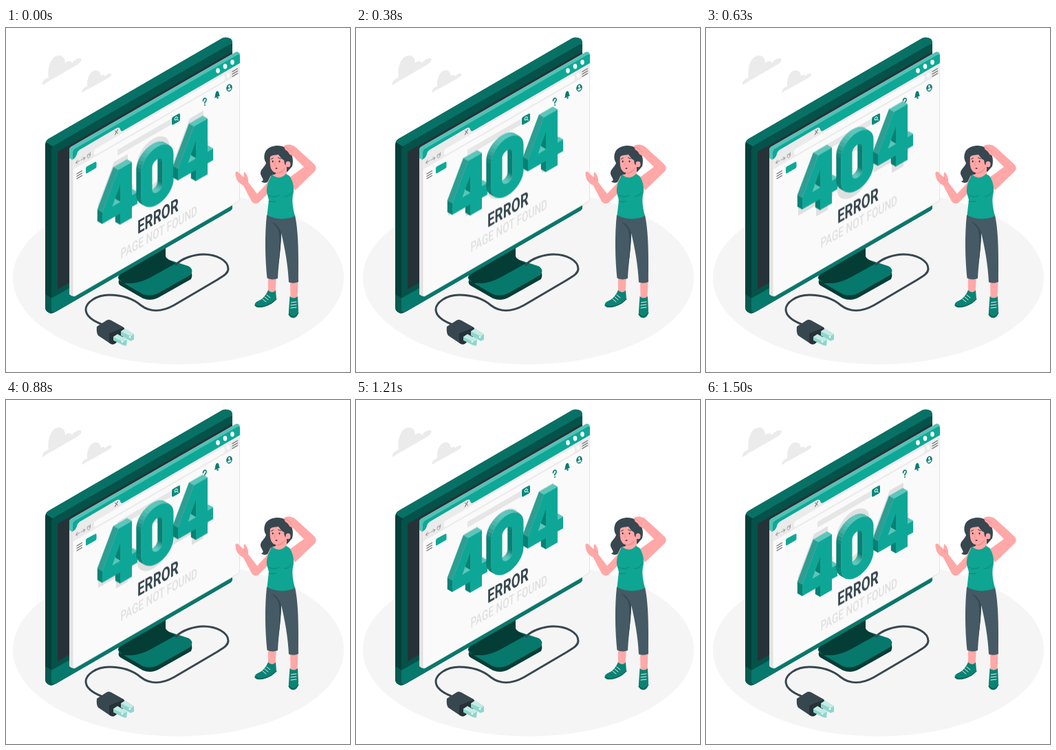
These frames come from a looping animation (500x500 px, 1.54 s). An HTML page:

```html
<!DOCTYPE html>
<html lang="en">
<head>
<meta charset="utf-8">
<title>404</title>
<style>
  html, body { margin: 0; width: 100%; height: 100%; overflow: hidden; background: #fff; }
  svg { display: block; width: 100vw; height: 100vh; }
  text { font-family: Roboto, Arial, sans-serif; }
  .float { animation: rise 770ms cubic-bezier(.37, 0, .63, 1) -60ms infinite alternate; }
  #digits { --lift: -22px; }
  #label { --lift: -16px; }
  @keyframes rise {
    from { transform: translateY(0); }
    to { transform: translateY(var(--lift)); }
  }
  .line { fill: none; stroke-linecap: round; stroke-linejoin: round; }
</style>
</head>
<body>
<svg viewBox="0 0 500 500">
  <ellipse cx="250.5" cy="363" rx="240.5" ry="126" fill="#f5f5f5"/>

  <g id="clouds" fill="#ebebeb">
    <path d="M53 83C52 78 56 74 62 72C60 60 64 43 74 40.500C82 38 86 44 86 51C90 47 95 48 96 51C99 46 106 43 109 44.500C111 47 108 50 104 53L68 74C62 76 58 81 53 83Z"/>
    <path d="M110 94C111 88 114 86 118 85C117 74 122 63 128 62C134 60 138 65 138 70C141 67 143 68 144 70C148 66 152 65 153 67C154 69 151 71 148 73L121 88C117 89 114 93 110 94Z"/>
  </g>

  <g id="stand">
    <path d="M166 363L222 332L266 352Q273 356 269 365L223 391Q211 398 199 393L166 374Q161 370 166 363Z" fill="#043d36"/>
    <path d="M166 358L222 327L234 336L265 346Q274 351 268 359L222 385Q211 391 199 387L166 368Q160 363 166 358Z" fill="#07786c"/>
    <path d="M163 363Q163 360 166 358L232 317V332Q233 336 247 342L211 362Q196 370 184 371L170 371Z" fill="#043d36"/>
  </g>

  <path class="line" stroke="#37474f" stroke-width="3" d="M247 344C256 334 275 329 287 329C306 329 323 338 323 350C323 357 315 361 307 366L244 403C226 413 209 413 196 403C182 391 164 388 150 388C130 388 116 400 116 409C116 419 127 426 140 431"/>

  <g id="plug">
    <path d="M132 434L146 425Q149 423 153 425L171 435Q173 437 172 447L158 459Q153 461 149 457L134 447Q131 443 132 434Z" fill="#37474f"/>
    <path d="M150 444L171 435.500Q173 438 172 447L158 459Q153 461 150 457Z" fill="#263238"/>
    <path d="M156 449L162 445L176 453L175 462L170 461L156 454Z" fill="#8fd6cd"/>
    <path d="M156 449L162 445L176 453L170 456Z" fill="#c4ebe5"/>
    <path d="M167 441L173 437L186 445V453L181 455L167 447Z" fill="#8fd6cd"/>
    <path d="M167 441L173 437L186 445L181 448Z" fill="#c4ebe5"/>
    <g fill="#fff"><circle cx="169" cy="456" r="1.300"/><circle cx="180" cy="449" r="1.300"/></g>
  </g>

  <g id="monitor">
    <path d="M57 170Q57 164 62 161L314 15Q320 12 327 16Q329 18 329 23V260Q329 264 325 266L71 413Q66 416 61 413Q57 411 57 405Z" fill="#04403a"/>
    <path d="M57 387L67 393V415Q63 415 61 413Q57 411 57 405Z" fill="#065a50"/>
    <path d="M58 166Q59 163 62 161L314 15Q320 12 327 16Q329 18 329 23L72 171Q68 173 66 171Z" fill="#087165"/>
    <path d="M66 178Q66 173 71 170L323 25Q329 22 329 28V260H66Z" fill="#05524a"/>
    <path d="M66 250H329V260Q329 264 325 266L73 412Q66 416 66 408Z" fill="#05524a"/>
    <path d="M66 393L329 242V260Q329 264 325 266L73 412Q66 416 66 408Z" fill="#07786c"/>
    <path d="M75 180L329 34V233L75 380Z" fill="#263238"/>
  </g>

  <g id="window">
    <path d="M92 177Q92 175 94 173L333 35.500Q336 33 340 37V248Q340 251 337 253L100 390Q96 391 92 387Z" fill="#e3e3e3"/>
    <path d="M97 180L339.500 41V248Q339.500 251 337 252.500L101 389Q97 391 97 386Z" fill="#fafafa" stroke="#e0e0e0" stroke-width=".8"/>
    <path d="M92 177Q92 175 94 173L333 35.500Q336 33 340 37L97 182V192L92 189Z" fill="#53c1b4"/>
    <path d="M97 181Q97 178 99.500 176L337 38.500Q340 37 340 40V52L97 192Z" fill="#0ea897"/>
    <path d="M97 191Q102 188 103 183Q104 179 107 177L160 146Q165 143 166 147Q166.500 151 170 149.500L340 51V66L97 206Z" fill="#ebebeb"/>
    <path d="M128 179.500Q128 177 131 175L315 69Q318 68 318 71V74Q318 76 315 78L131 184Q128 185 128 183Z" fill="#fafafa"/>
    <g fill="#fff">
      <ellipse cx="308" cy="62" rx="2.800" ry="3.700"/>
      <ellipse cx="318.500" cy="55.800" rx="2.800" ry="3.700"/>
      <ellipse cx="329" cy="49.800" rx="2.800" ry="3.700"/>
    </g>
    <g class="line" stroke="#9e9e9e">
      <path d="M107 193L101.500 196M104 192L101.500 196L104 197M109 192L115 188.500M112 188L115 188.500L113 192M122 184Q121 181 118.500 184Q117 188 119.500 189Q122 188 122.500 185M122.500 181V184.500H120"/>
    </g>
    <path class="line" stroke="#616161" d="M158.500 149.500L162.500 153M162.500 147.500L158.500 155"/>
    <path class="line" stroke="#757575" stroke-width="1.300" d="M329 63.500L336.500 59M329 67L336.500 62.500M329 70.500L336.500 66"/>
    <ellipse cx="323" cy="69" rx="2.500" ry="3.500" fill="#fafafa"/>
    <path class="line" stroke="#757575" stroke-width="1.400" d="M103 212L110.500 207.500M103 215.500L110.500 211M103 219L110.500 214.500"/>
    <path d="M116 204Q116 202 118 201L130 194.500Q131.500 194 131.500 196V201.500Q131.500 203 130 204L118 211Q116 212 116 210Z" fill="#0ea897"/>
    <path d="M162 177L240 132V140.500L162 185.500Z" fill="#e6e6e6"/>
    <path d="M241 132Q241 130 243 129L251 124.500Q253 123.500 253 125.500V133Q253 135 251 136L243 140.500Q241 141 241 139.500Z" fill="#0a8a7d"/>
    <path class="line" stroke="#fff" d="M249.500 130.500Q249 128 246.500 129.500Q244.500 132 245.500 134Q247.500 135 249.500 130.500M248.500 133L250.500 134"/>
    <g id="icons" fill="#0a7c70">
      <path class="line" stroke="#0a7c70" stroke-width="1.600" d="M286.500 106Q286.500 103 289 102Q291.500 102 291 105Q290.500 107 289 108V109.500"/>
      <circle cx="289" cy="112" r="1"/>
      <path d="M303 102C304.500 100 303.500 93 307 91.500C310.500 92 309 97 311 98.500Z"/>
      <circle cx="307.500" cy="101.500" r="1.300"/>
      <ellipse cx="324.500" cy="87" rx="4.200" ry="5.500" transform="rotate(15 324.500 87)"/>
      <g fill="#fafafa"><ellipse cx="324.500" cy="85" rx="1.500" ry="1.900"/><path d="M321.500 90Q324 86.500 327.500 87.500Q326.500 91 323.500 91Z"/></g>
    </g>
  </g>

  <g id="label" class="float">
    <text transform="matrix(.7 -.402 0 1 191 300)" font-size="27" font-weight="700" fill="#37474f">ERROR</text>
    <text transform="matrix(.685 -.394 0 1 166.500 336)" font-size="20" font-weight="500" fill="#e0e0e0">PAGE NOT FOUND</text>
  </g>
  <g id="shadow" fill="#e0e0e0" fill-rule="evenodd" transform="translate(-6 -12)"></g>
  <g id="digits" class="float" fill-rule="evenodd"></g>

  <g id="woman">
    <g fill="#ffa8a7">
      <path d="M381 360H393L391.500 384L384 388L381 382Z"/>
      <path d="M413 366H424.500L423.500 392Q418 396 413.500 391Z"/>
    </g>
    <g fill="#0a8374">
      <path d="M381 381C385 385 389 385 392 381L393 393C388 400 376 408 365 406C360 404 361 400 365 397.500C374 394 378 388 381 381Z"/>
      <path d="M412.500 390Q418 395 424 390L425 410C425 418 422 421 418 421.500C412 421 410.500 418 411 411Z"/>
    </g>
    <path class="line" stroke="#075b51" stroke-width="1.200" d="M362 403Q372 408 386 400L393 394M411 416Q418 424 425 414"/>
    <path class="line" stroke="#fff" stroke-width=".9" d="M376 391L381 395M373 394L378 398M379 388L384 392M414.500 399L422 398M414 403L422 402M414 407L422 406"/>
    <path d="M379 272H420C426 300 425 340 425 369Q418 372 411 369.500C410 345 405 318 400 298C399 320 396 345 395 364Q387 367 379.500 363.500C376.500 335 376 300 379 272Z" fill="#455a64"/>
    <path d="M400 298Q396 285 385 281Q393 287 396 294C399 311 397 330 395 350Q400 320 400 298Z" fill="#37474f"/>
    <path d="M378 178C384 170 399 169 406 174C415 178 419 190 416 201L409 209L386 214C385 223 377 228 371 223C377 221 371 217 370 212C369 205 377 202 378 196C374 190 375 183 378 178Z" fill="#37474f"/>
    <g fill="#ffa8a7">
      <path d="M404 171C410 168 418 169 424 176L447 197C452 202 452 206 446 211L420 236L411 218L433 202L417 186C411 184 405 179 404 171Z"/>
      <path d="M385 214L379 226L365 241L352 224C353 219 350 212 347 209.500C345 210 346 214 345.500 217L337 209C334 208 332.500 210 334 215C335 222 339 226 345 229L357 252C361 257 366 256 370 251L385 236Z"/>
      <path d="M391 202L408 198L408 213L412 217Q400 225 386 215L392 212Z"/>
    </g>
    <path d="M392 209Q402 208 406 202Q404 212 392 212Z" fill="#f28f8f"/>
    <path d="M387 213C382 221 378 230 379 239L382 250L379.500 272C391 279 410 279 420 273C417 262 415.500 252 417 243C420 234 417 222 412 215L407 212C401 219 393 219 387 213Z" fill="#0ea592"/>
    <path class="line" stroke="#0a8374" stroke-width=".9" d="M382 243Q390 248 397 243M405 245Q411 245 415 239M382 252Q388 253 392 252"/>
    <path d="M384 187C385 181 393 180 398 182C404 184 408 190 407 198C405 206 398 211 391 210C384 208 383 198 384 187Z" fill="#ffa8a7"/>
    <path d="M383 189C385 184 391 185 396 184C399 188 401 191 404 192L405 198L410 202C416 195 414 184 409 179C400 171 384 176 381 185Z" fill="#37474f"/>
    <ellipse cx="410" cy="198" rx="3.500" ry="4.300" fill="#ffa8a7"/>
    <g fill="#263238">
      <ellipse cx="387.700" cy="194" rx="1" ry="1.400"/><ellipse cx="397.500" cy="194" rx="1" ry="1.400"/>
    </g>
    <ellipse cx="393" cy="204" rx="1.600" ry="1.100" fill="#7a2f35"/>
    <path class="line" stroke="#263238" stroke-width=".9" d="M385.500 190.500L388.500 189M395.500 188.500L399.500 190"/>
    <path class="line" stroke="#f28f8f" stroke-width=".9" d="M391.500 194L390 199.500H392M405 173Q410 174 416 180M345.500 217L348 221"/>
  </g>
</svg>
<script>
  const SLOPE = 0.575, DEPTH = [-7, -4];
  const LIGHT = [92, 198, 187], DARK = [9, 128, 116], FACE = '#0ea797';
  const digits = document.getElementById('digits');
  const shadow = document.getElementById('shadow');

  const project = ([x, y]) => [x, y - SLOPE * (x - 140)];
  const toPath = pts => 'M' + pts.map(p => p.map(v => v.toFixed(2)).join(' ')).join('L') + 'Z';

  function add(parent, d, fill) {
    const el = document.createElementNS('http://www.w3.org/2000/svg', 'path');
    el.setAttribute('d', d);
    if (fill) el.setAttribute('fill', fill);
    parent.append(el);
    return el;
  }

  // Clockwise outline with round ends
  function capsule(cx, cy, w, h) {
    const r = w / 2, straight = h / 2 - r, n = 32;
    return Array.from({ length: n + 2 }, (_, i) => {
      const lower = i > n / 2, a = Math.PI * (1 + (i - lower) * 2 / n);
      return [cx + r * Math.cos(a), cy + r * Math.sin(a) + (lower ? straight : -straight)];
    });
  }

  function four(dx) {
    const outer = [[163, 220], [183, 220], [183, 268], [191, 268], [191, 285], [183, 285],
      [183, 301], [166, 301], [166, 285], [140, 285], [140, 268]];
    const hole = [[166, 268], [166, 243], [154.5, 268]];
    return [outer, hole].map(ring => ring.map(([x, y]) => [x + dx, y]));
  }

  const zero = () => [capsule(220, 261, 47, 84), capsule(220, 261, 15, 48).reverse()];

  // Side wall of one outline edge, shaded by how far it faces upwards
  function wall(a, b) {
    const p = project(a), q = project(b);
    const dx = q[0] - p[0], dy = q[1] - p[1];
    if (dy * DEPTH[0] - dx * DEPTH[1] <= 0) return;
    const up = Math.max(0, (b[0] - a[0]) / Math.hypot(b[0] - a[0], b[1] - a[1]));
    const color = `rgb(${DARK.map((v, i) => Math.round(v + (LIGHT[i] - v) * up))})`;
    const back = ([x, y]) => [x + DEPTH[0], y + DEPTH[1]];
    add(digits, toPath([p, q, back(q), back(p)]), color).setAttribute('stroke', color);
  }

  digits.setAttribute('stroke-width', 0.4);
  for (const rings of [four(0), zero(), four(110)]) {
    for (const ring of rings) ring.forEach((p, i) => wall(p, ring[(i + 1) % ring.length]));
    const face = rings.map(ring => toPath(ring.map(project))).join('');
    add(digits, face, FACE);
    add(shadow, face);
  }
</script>
</body>
</html>
```
